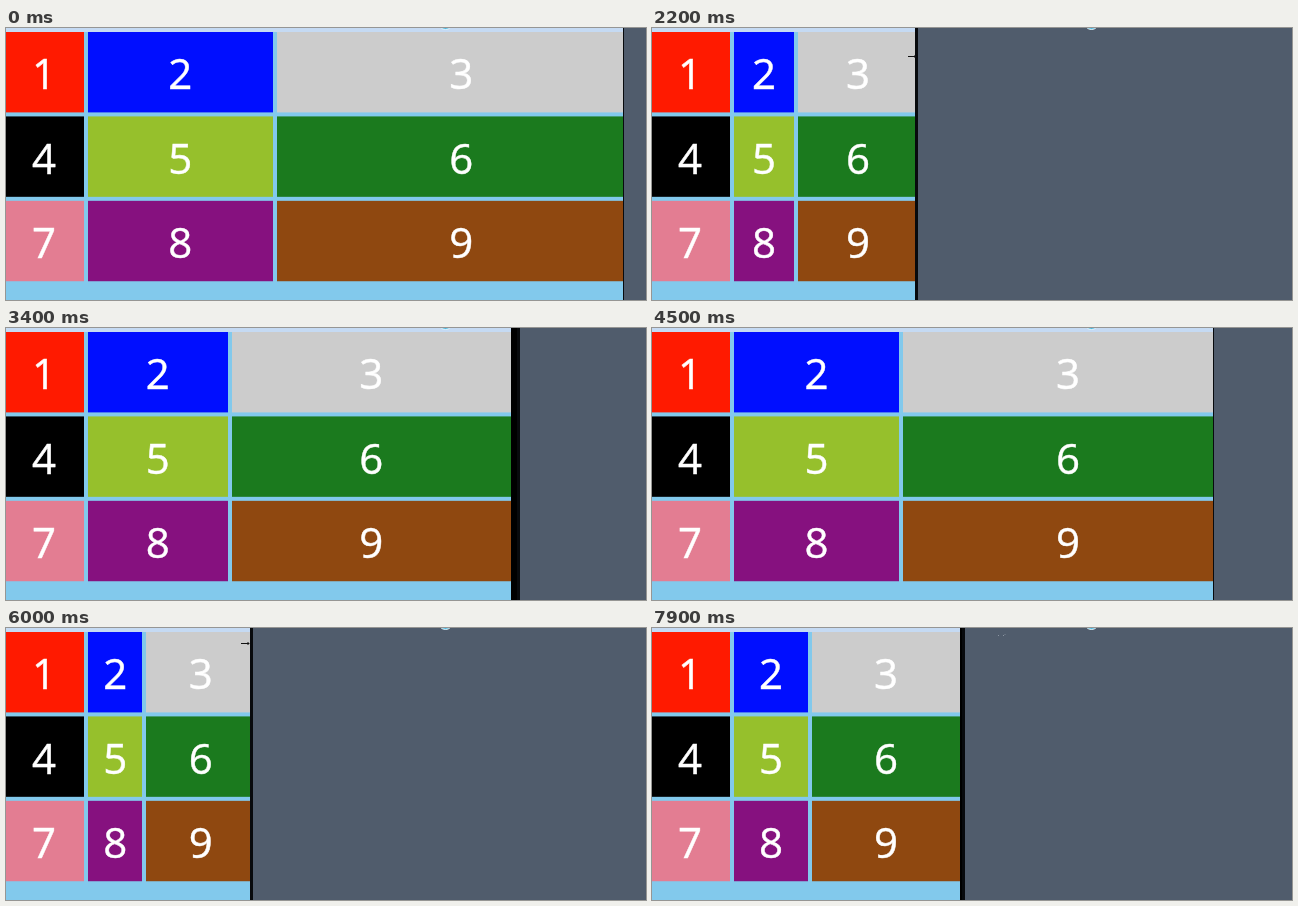
Recreate the animation shown at these times as an HTML page. Size 640 by 272 pixels, loop 8 s.

```html
<!DOCTYPE html>
<html lang="en">
<head>
<meta charset="utf-8">
<title>Resizing grid</title>
<style>
  html, body { margin: 0; width: 100%; height: 100%; overflow: hidden; background: #505c6c; }
  #stage { position: relative; width: 640px; height: 272px; overflow: hidden; }
  #window { position: absolute; left: 0; top: 0; height: 272px; overflow: hidden; background: #000; border-right: 3px solid #080a0d; }
  #page { position: absolute; left: 0; top: 0; height: 272px; overflow: hidden; background: #82c9ec; }
  #page::before { content: ""; position: absolute; left: 0; top: 0; width: 100%; height: 4px; background: #c5daf3; }
  #grid {
    position: absolute; left: -2px; top: 4px; right: 0;
    display: grid; grid-template: repeat(3, 80px) / 80px 1fr 2fr; gap: 4px;
    transform: scaleY(1.005); transform-origin: top;
    font: 42px/81px "Open Sans", "Noto Sans", sans-serif; color: #fff; text-align: center;
    -webkit-text-stroke: .5px #fff;
  }
  #grid div { min-width: 0; overflow: hidden; }
  #dot { position: absolute; left: 432px; top: -13px; width: 13px; height: 13px; border: 1.5px solid #e4f5fc; border-radius: 50%; background: #52b9df; }
  #cursor { position: absolute; left: -4px; top: -3px; }
  #cursor path { fill: none; stroke: #111; }
  #cursor.faint path { stroke: #8b95a2; stroke-dasharray: 1 4; }
</style>
</head>
<body>
<div id="stage">
  <div id="window"><div id="page"><div id="grid"></div></div></div>
  <div id="dot"></div>
  <svg id="cursor" width="9" height="6"><path d="M0 2.5H8M6.5 1L8 2.5L6.5 4"/></svg>
</div>
<script>
  const LOOP = 8000, STEP = 100, PAGE_DELAY = 60;
  const colors = ["#ff1a00", "#000eff", "#cccccc", "#000000", "#96c02c", "#1b7a1e", "#e37d92", "#86117f", "#8f4810"];
  const pauses = [5, 35, 64, 67, 74, 76, 78];

  // Turning points of the drag: [time, value]
  const widths = [
    [-60, 640], [0, 617], [400, 587], [1200, 429], [1700, 321], [2200, 263], [2300, 261],
    [3200, 492], [3400, 511], [4100, 640], [4400, 592], [5000, 348], [5300, 304],
    [6700, 205], [6900, 200], [7300, 296], [7900, 310], [8000, 316]
  ];
  const heights = [[0, -12], [1200, 20], [2200, 29], [3400, -1], [4000, -12], [5300, 15], [6800, 16], [8000, 8]];

  const $ = id => document.getElementById(id);
  const view = $("window"), page = $("page"), cursor = $("cursor");
  colors.forEach((color, i) => {
    const cell = document.createElement("div");
    cell.style.background = color;
    cell.textContent = i + 1;
    $("grid").append(cell);
  });

  function slope(keys, i) {
    const a = keys[i], b = keys[i + 1];
    return a && b ? (b[1] - a[1]) / (b[0] - a[0]) : 0;
  }

  function tangent(keys, i) {
    const a = slope(keys, i - 1), b = slope(keys, i);
    return a * b > 0 ? 2 * a * b / (a + b) : 0;
  }

  // Monotone cubic, so the drag never overshoots its turning points
  function sample(keys, time) {
    const i = Math.min(keys.findLastIndex(k => k[0] <= time), keys.length - 2);
    const [t0, a] = keys[i], [t1, b] = keys[i + 1];
    const span = t1 - t0, u = (time - t0) / span, v = 1 - u;
    return v * v * (1 + 2 * u) * a + u * u * (1 + 2 * v) * b
      + span * u * v * (v * tangent(keys, i) - u * tangent(keys, i + 1));
  }

  function draw(now) {
    let step = Math.floor(now % LOOP / STEP);
    if (pauses.includes(step)) step--;
    const time = step * STEP;
    const width = Math.round(sample(widths, time));
    const pageWidth = Math.round(sample(widths, time - PAGE_DELAY));
    const lag = pageWidth - width, growing = lag < 0;
    const y = Math.round(sample(heights, time));

    view.style.width = width + "px";
    // A fast inward drag leaves a thinner edge
    view.style.borderRightWidth = Math.round(Math.min(3, Math.max(1, 4 - lag / 5))) + "px";
    page.style.width = pageWidth + "px";
    cursor.style.transform = `translate(${width + (growing ? 40 : -lag)}px, ${y}px)`;
    cursor.classList.toggle("faint", growing && y > 3);
  }

  const start = performance.now();
  function tick() {
    draw(performance.now() - start);
    requestAnimationFrame(tick);
  }
  tick();
</script>
</body>
</html>
```
